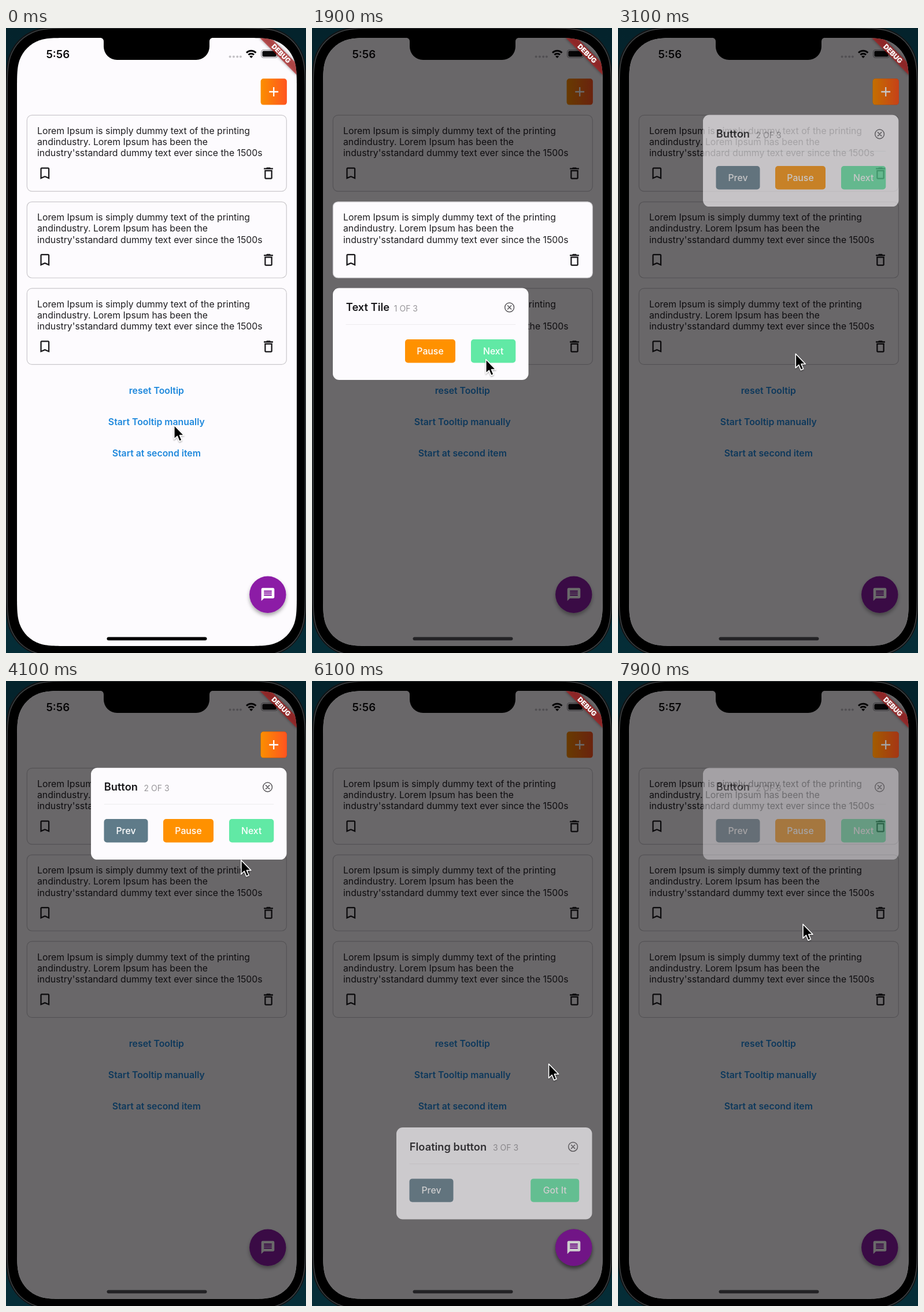
An HTML page for the animation above (8 s loop, 519 by 1078 pixels).

```html
<!DOCTYPE html>
<html lang="en">
<head>
<meta charset="utf-8">
<title>Tooltip tour</title>
<style>
  html, body { margin: 0; width: 100%; height: 100%; overflow: hidden; background: #06303b; }
  svg { display: block; width: 519px; height: 1078px; font-family: Inter, Roboto, sans-serif; }
  .body { font-size: 15.8px; fill: #1f1e21; }
  .link { font-size: 15.8px; font-weight: 600; fill: #1e88dc; text-anchor: middle; }
  .label { font-size: 15.8px; font-weight: 500; fill: #fff; text-anchor: middle; }
  .title { font-size: 18.3px; font-weight: 600; fill: #19181b; }
  .count { font-size: 14px; fill: #98969a; }
</style>
</head>
<body>
<svg id="stage" viewBox="0 0 519 1078" xmlns="http://www.w3.org/2000/svg"></svg>
<script>
const LOOP = 8000, FADE = 400, ICON = 1.129;
const PAPER = '#fdfbfe';

const ICONS = {
  bookmark: 'M17 3H7c-1.1 0-2 .9-2 2v16l7-3 7 3V5c0-1.1-.9-2-2-2zm0 15l-5-2.18L7 18V5h10v13z',
  trash: 'M6 19c0 1.1.9 2 2 2h8c1.1 0 2-.9 2-2V7H6v12zM8 9h8v10H8V9zm7.5-5l-1-1h-5l-1 1H5v2h14V4h-3.5z',
  plus: 'M19 13h-6v6h-2v-6H5v-2h6V5h2v6h6v2z',
  chat: 'M20 2H4c-1.1 0-1.99.9-1.99 2L2 22l4-4h14c1.1 0 2-.9 2-2V4c0-1.1-.9-2-2-2zm-2 12H6v-2h12v2zm0-3H6V9h12v2zm0-3H6V6h12v2z'
};

const text = (cls, x, y, s) => `<text class="${cls}" x="${x}" y="${y}">${s}</text>`;
const rect = (x, y, w, h, r, attrs) =>
  `<rect x="${x}" y="${y}" width="${w}" height="${h}" rx="${r}" ${attrs}/>`;
const icon = (name, cx, cy, fill) =>
  `<path d="${ICONS[name]}" fill="${fill}" transform="translate(${cx} ${cy}) scale(${ICON}) translate(-12 -12)"/>`;

// Rectangle whose corners bend gradually, as on the phone's casing
function smoothRect(x, y, w, h, r, attrs) {
  const bend = [[0, 1.53], [0, 1.09], [0, .868], [.07, .65], [.169, .373], [.373, .169],
    [.65, .07], [.868, 0], [1.09, 0], [1.53, 0]];
  const corner = (right, low) => {
    const pts = bend.map(([a, b]) =>
      `${right ? x + w - a * r : x + a * r} ${low ? y + h - b * r : y + b * r}`);
    if (right !== low) pts.reverse();
    return pts[0] + 'C' + pts.slice(1).join(' ');
  };
  const d = 'M' + [[false, false], [true, false], [true, true], [false, true]]
    .map(c => corner(...c)).join('L') + 'Z';
  return `<path d="${d}" ${attrs}/>`;
}

const LINES = [
  'Lorem Ipsum is simply dummy text of the printing',
  'andindustry. Lorem Ipsum has been the',
  "industry'sstandard dummy text ever since the 1500s"
];

function card(i) {
  const y = 150 + i * 149.4;
  return rect(36.3, y + .4, 449, 131.2, 8.5, `fill="${PAPER}" stroke="#cac8cc" stroke-width="1.2"`) +
    LINES.map((s, k) => text('body', 54, y + 32.7 + k * 19.35, s)).join('') +
    icon('bookmark', 67.3, y + 100.6, '#19181b') +
    icon('trash', 454, y + 100.6, '#19181b');
}

const addButton = () =>
  rect(440.6, 87.3, 45.3, 45.3, 4.8, 'fill="url(#warm)"') + icon('plus', 463.2, 110, '#fff');

const fab = () =>
  '<circle cx="452.8" cy="977.2" r="31.7" fill="#8c1ea6" filter="url(#lift)"/>' +
  icon('chat', 453, 977, '#fff');

const COLORS = { Prev: '#5f7b89', Pause: '#ff9100', Next: '#61e9a5', 'Got It': '#61e9a5' };

function button(name, x, w) {
  return rect(x, 88.4, w, 40.4, 5, `fill="${COLORS[name]}"`) + text('label', x + w / 2, 114.2, name);
}

function tooltip(x, y, title, count, countX, buttons) {
  return `<g transform="translate(${x} ${y})">` +
    rect(0, 0, 338.5, 158.4, 11, `fill="${PAPER}"`) +
    text('title', 22.8, 39.8, title) + text('count', countX, 40.4, count) +
    '<g fill="none" stroke="#5a585c" stroke-width="1.5" stroke-linecap="round">' +
    '<circle cx="305.6" cy="33.3" r="7.9"/><path d="M302.5 30.2l6.2 6.2m0-6.2l-6.2 6.2"/></g>' +
    rect(22.6, 62.4, 293.6, 1, 0, 'fill="#edebee"') +
    buttons.map(b => button(...b)).join('') + '</g>';
}

const PREV = ['Prev', 22.5, 76], PAUSE = ['Pause', 125, 87], NEXT = ['Next', 239, 77.3];
const STEPS = [
  card(1) + tooltip(36, 448.6, 'Text Tile', '1 OF 3', 105.8, [PAUSE, NEXT]),
  addButton() + tooltip(147, 149.7, 'Button', '2 OF 3', 91.5, [PREV, PAUSE, NEXT]),
  fab() + tooltip(146, 770, 'Floating button', '3 OF 3', 167, [PREV, ['Got It', 232.2, 84]])
];

const statusBar = () =>
  '<text id="clock" x="89.8" y="51.6" font-size="18.7" font-weight="600" fill="#0b0b0c" text-anchor="middle"></text>' +
  [387.6, 393.9, 400.2, 405.9].map(x => `<circle cx="${x}" cy="49.6" r="2" fill="#c3c1c5"/>`).join('') +
  '<g fill="none" stroke="#0b0b0c" stroke-width="3">' +
  '<path d="M416 42.7a11.6 11.6 0 0 1 16.4 0M419.4 46.2a6.8 6.8 0 0 1 9.6 0"/></g>' +
  '<path d="M424.2 52l-3-3.1a4.2 4.2 0 0 1 6 0z" fill="#0b0b0c"/>' +
  rect(441.6, 37.8, 28, 13.4, 4, 'fill="none" stroke="#8f8d91" stroke-width="1.1"') +
  rect(443.4, 39.6, 24.4, 9.8, 2.5, 'fill="#0b0b0c"');

const ribbon = () =>
  '<g transform="translate(503 17) rotate(45)">' +
  rect(-46, 31.6, 92, 13.6, 0, 'fill="#000" opacity=".42" filter="url(#soft)"') +
  rect(-46, 31.6, 92, 13.6, 0, 'fill="#b71c1c" opacity=".66"') +
  '<text y="42.5" font-size="11.8" font-weight="900" fill="#fff" text-anchor="middle">DEBUG</text></g>';

document.getElementById('stage').innerHTML = `
<defs>
  <linearGradient id="warm"><stop offset="0" stop-color="#fb8f00"/><stop offset="1" stop-color="#ff5420"/></linearGradient>
  <linearGradient id="desk" x2="0" y2="1"><stop offset="0" stop-color="#04232c"/><stop offset="1" stop-color="#052d37"/></linearGradient>
  <filter id="lift" x="-30%" y="-30%" width="160%" height="170%">
    <feDropShadow dx="0" dy="4" stdDeviation="3.2" flood-color="#000" flood-opacity=".34"/></filter>
  <filter id="drop" x="-40%" y="-30%" width="180%" height="170%">
    <feDropShadow dx="0" dy="1.5" stdDeviation="1.2" flood-color="#000" flood-opacity=".35"/></filter>
  <filter id="soft" x="-20%" y="-80%" width="140%" height="260%"><feGaussianBlur stdDeviation="2.4"/></filter>
  <clipPath id="screen">${smoothRect(19, 17, 484, 1049, 60, '')}</clipPath>
</defs>
${rect(0, 0, 519, 1078, 0, 'fill="url(#desk)"')}
${smoothRect(-.5, -2.5, 520.5, 1088, 78, 'fill="#121517"')}
${smoothRect(2.2, .2, 515.4, 1082.8, 76, 'fill="#000" stroke="#44484a" stroke-width="1.3"')}
<g clip-path="url(#screen)">
  ${rect(19, 17, 484, 1049, 0, `fill="${PAPER}"`)}
  ${statusBar()}${addButton()}${[0, 1, 2].map(card).join('')}
  ${text('link', 260.3, 630.6, 'reset Tooltip')}
  ${text('link', 260.3, 685, 'Start Tooltip manually')}
  ${text('link', 260.3, 739.3, 'Start at second item')}
  ${fab()}
  ${rect(19, 17, 484, 1049, 0, 'id="shade" fill="#020003" opacity=".59"')}
  ${STEPS.map(s => `<g class="step">${s}</g>`).join('')}
  ${rect(174.5, 1050.4, 173, 5.8, 2.9, 'id="bar"')}
  ${ribbon()}
</g>
<path d="M162 16.5q7 .5 7 7V32a23 23 0 0 0 23 23H329a23 23 0 0 0 23-23V23.5q0-6.500 7-7z" fill="#000"/>
<g id="cursor" filter="url(#drop)">
  <path d="M.8 0V24.200L6.300 19 9.900 27.800 14.100 26 10.500 17.500H17.800Z" fill="#000" stroke="#fff" stroke-width="1.6" stroke-linejoin="round"/>
</g>`;

const $ = id => document.getElementById(id);
const shade = $('shade'), bar = $('bar'), clock = $('clock'), cursor = $('cursor');
const steps = [...document.querySelectorAll('.step')];

// [step, fade-in start, dismissed]
const SHOWS = [[0, 555, 2350], [1, 2850, 5340], [2, 5830, 7240], [1, 7740, LOOP]];

// [time, x, y] of the pointer tip; a repeated place is a rest
const PATH = [
  [0, 290, 685], [400, 290, 680], [1000, 290, 680], [1700, 300, 571.5], [2500, 300, 571.5],
  [3080, 306.5, 562], [3250, 306.5, 562], [4400, 426, 258], [5550, 426, 258],
  [6100, 409, 660], [6700, 208, 868], [7260, 208, 868], [7900, 319, 420], [8400, 410, 262]
];

// Speed along one axis at a key: none at a rest or turning point
function speed(i, k) {
  const a = PATH[i - 1], b = PATH[i], c = PATH[i + 1];
  if (!a || !c || (b[k] - a[k]) * (c[k] - b[k]) <= 0) return 0;
  return (c[k] - a[k]) / (c[0] - a[0]);
}

function pointer(t) {
  const j = PATH.findIndex(p => p[0] > t), i = j - 1;
  const span = PATH[j][0] - PATH[i][0], u = (t - PATH[i][0]) / span, v = 1 - u;
  return [1, 2].map(k =>
    v * v * (1 + 2 * u) * PATH[i][k] + u * u * (1 + 2 * v) * PATH[j][k] +
    span * u * v * (v * speed(i, k) - u * speed(j, k)));
}

function draw(t) {
  const dim = t >= 100;
  shade.style.display = dim ? '' : 'none';
  bar.setAttribute('fill', dim ? '#232225' : '#000');
  clock.textContent = t < 7000 ? '5:56' : '5:57';

  const show = SHOWS.find(([, from, to]) => t >= from && t < to);
  steps.forEach((el, i) => {
    const on = show && show[0] === i;
    el.style.display = on ? '' : 'none';
    if (on) el.setAttribute('opacity', Math.min(1, (t - show[1]) / FADE));
  });

  cursor.setAttribute('transform', `translate(${pointer(t)})`);
}

const start = performance.now();
function tick() {
  draw((performance.now() - start) % LOOP);
  requestAnimationFrame(tick);
}
tick();
</script>
</body>
</html>
```
